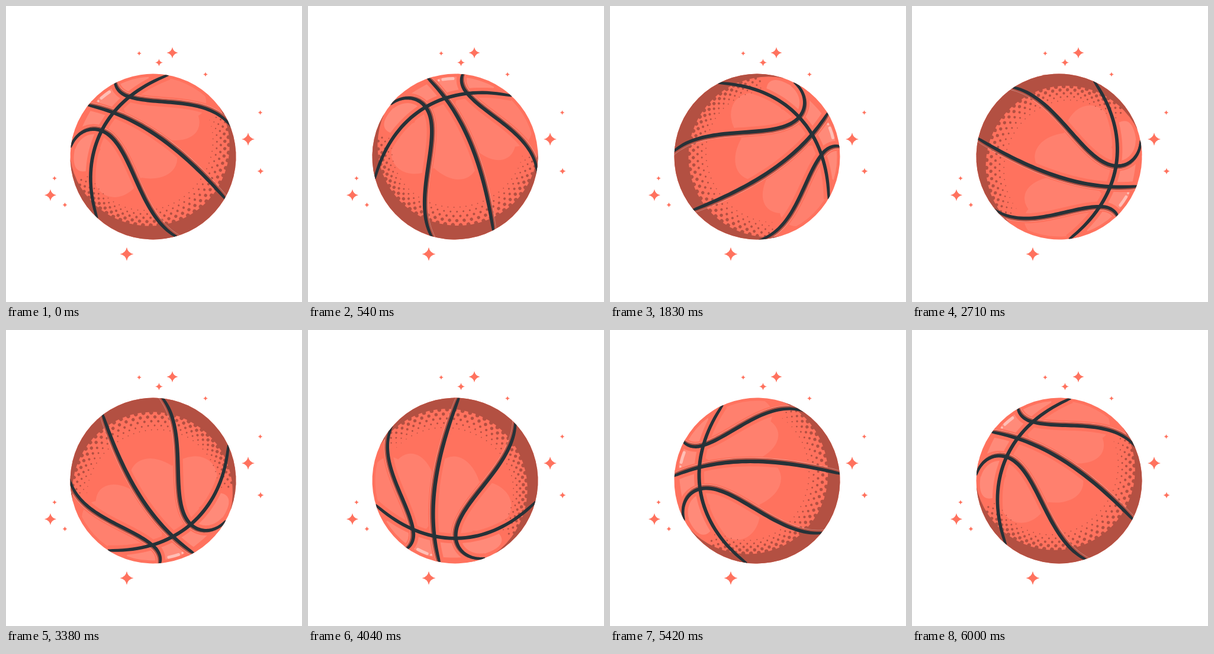
Recreate the animation shown at these times as an HTML page with a canvas. Size 500 by 500 pixels, loop 6040 ms.

```html
<!DOCTYPE html>
<html lang="en">
<head>
<meta charset="utf-8">
<title>Spinning basketball</title>
<style>
html, body { margin: 0; width: 100%; height: 100%; overflow: hidden; background: #fff; }
canvas { display: block; width: 500px; height: 500px; }
</style>
</head>
<body>
<canvas id="stage"></canvas>
<script>
const canvas = document.getElementById('stage');
const ctx = canvas.getContext('2d');
const dpr = window.devicePixelRatio || 1;
canvas.width = canvas.height = 500 * dpr;

const LOOP = 6040, FRAME = 1000 / 24, TURN = 2.5, TILT = -65;
const CORAL = '#ff725e', SHADE = '#b35042', INK = '#263238';
const CX = 248.5, CY = 254.5, R = 140;
const LIT = { x: 14, y: -13.6, r: 135.5 };
const rad = d => d * Math.PI / 180;
const white = a => `rgba(255,255,255,${a})`;

// Ball geometry is upright, with its centre at the origin.
// Each seam is a chain of cubic Bezier curves.
const seams = {
  left: [[-45, -133], [-22, -136], [2, -122], [3, -96], [5, -40], [-104, 20], [-106, 96]],
  middle: [[32, -138], [53.5, -45], [28, 47], [-13.5, 142]],
  right: [[88, -112], [80, -108], [74, -99], [74, -86], [76, -35], [134, 38], [102, 98]],
  equator: [[-134.5, -41.5], [-52, -117.3], [52, -117], [136, -35]]
};

function bezier(p, t) {
  const u = 1 - t, k = [u * u * u, 3 * u * u * t, 3 * u * t * t, t * t * t];
  return [0, 1].map(axis => k.reduce((sum, f, i) => sum + f * p[i][axis], 0));
}

function sample(chain) {
  const out = [chain[0]];
  for (let i = 0; i + 3 < chain.length; i += 3) {
    for (let s = 1; s <= 40; s++) out.push(bezier(chain.slice(i, i + 4), s / 40));
  }
  return out;
}

function polygon(pts) {
  const path = new Path2D();
  pts.forEach(p => path.lineTo(p[0], p[1]));
  path.closePath();
  return path;
}

// Seams get thinner as the surface turns away at the rim
function ribbon(line) {
  const left = [], right = [];
  line.forEach(([x, y], i) => {
    const a = line[Math.max(0, i - 1)], b = line[Math.min(line.length - 1, i + 1)];
    const dx = b[0] - a[0], dy = b[1] - a[1], len = Math.hypot(dx, dy);
    const facing = Math.max(0, 1 - (x * x + y * y) / (R * R));
    const half = (3.4 + 3.1 * facing ** 0.3) / 2;
    const nx = -dy / len * half, ny = dx / len * half;
    left.push([x + nx, y + ny]);
    right.unshift([x - nx, y - ny]);
  });
  return polygon(left.concat(right));
}

function disc(x, y, r) {
  const path = new Path2D();
  path.arc(x, y, r, 0, Math.PI * 2);
  return path;
}

function addEllipse(path, x, y, rx, ry, turn = 0) {
  const oval = new Path2D();
  oval.ellipse(x, y, rx, ry, turn, 0, Math.PI * 2);
  path.addPath(oval);
}

function halftone() {
  const path = new Path2D(), from = 42, to = 221, rows = 5;
  for (let row = 0; row < rows; row++) {
    for (let a = from + (row % 2) * 2.8; a < to; a += 5.6) {
      const depth = 22 + 9 * Math.cos(rad(a - 105)) ** 2;
      const d = LIT.r - 1 - depth * row / (rows - 1);
      const fade = Math.min(1, 0.55 + Math.min(a - from, to - a) / 40);
      path.addPath(disc(LIT.x + d * Math.cos(rad(a)), LIT.y + d * Math.sin(rad(a)), (3.3 - 0.6 * row) * fade));
    }
  }
  return path;
}

const ball = disc(0, 0, R), inside = disc(0, 0, R - 5);
const crescent = disc(0, 0, R + 2);
crescent.addPath(disc(LIT.x, LIT.y, LIT.r));
const dots = halftone();

const lines = {}, ribbons = {};
for (const name in seams) {
  lines[name] = sample(seams[name]);
  ribbons[name] = ribbon(lines[name]);
}
const above = polygon([...lines.equator, [R, -R], [-R, -R]]);

// One oval per panel; the gaps along the seams cut them apart
const lobes = new Path2D();
addEllipse(lobes, -40, -45, 53, 42);
addEllipse(lobes, 2, -30, 46, 71);
addEllipse(lobes, 74, -20, 42, 69);
addEllipse(lobes, 110, -20, 40, 65);
const cap = new Path2D();
addEllipse(cap, 30, -92, 105, 36, 0.12);

function fill(path, color, dx = 0, dy = 0) {
  ctx.save();
  ctx.translate(dx, dy);
  ctx.fillStyle = color;
  ctx.fill(path);
  ctx.restore();
}

function drawHighlights() {
  ctx.save();
  ctx.clip(inside);
  fill(lobes, white(0.1));
  fill(above, CORAL);
  ctx.clip(above);
  fill(cap, white(0.17));
  ctx.restore();

  ctx.strokeStyle = CORAL;
  ctx.lineWidth = 17;
  for (const name in lines) {
    ctx.beginPath();
    lines[name].forEach(p => ctx.lineTo(p[0], p[1]));
    ctx.stroke();
  }
}

function drawShine() {
  ctx.strokeStyle = white(0.45);
  ctx.lineWidth = 5;
  ctx.lineCap = 'round';
  ctx.beginPath();
  ctx.arc(0, 0, 132, rad(-66.5), rad(-59));
  ctx.stroke();
  fill(disc(46, -123.5, 1.8), white(0.45));
}

function drawBall(angle) {
  ctx.save();
  ctx.translate(CX, CY);
  ctx.rotate(angle);
  fill(ball, CORAL);
  ctx.clip(ball);
  drawHighlights();
  drawShine();
  ctx.fillStyle = SHADE;
  ctx.fill(crescent, 'evenodd');
  ctx.fill(dots);
  for (const name of ['left', 'middle', 'right']) {
    fill(ribbons[name], white(0.3), 3.2, 0.6);
    fill(ribbons[name], SHADE, 2.4, 0.4);
  }
  for (const name in ribbons) fill(ribbons[name], INK);
  ctx.restore();
}

// x, y, radius
const sparkles = [
  [281, 79, 9.5], [409, 225, 11], [75, 319.5, 10], [204, 419, 11.5], [225, 80, 4], [258.5, 95.5, 6.3],
  [337, 115.5, 4], [429.5, 180, 4], [430, 279, 5.5], [82, 291, 4], [99.5, 336, 4.2]
];

function drawSparkle([x, y, r]) {
  const k = r * 0.16;
  ctx.beginPath();
  ctx.moveTo(x, y - r);
  ctx.quadraticCurveTo(x + k, y - k, x + r, y);
  ctx.quadraticCurveTo(x + k, y + k, x, y + r);
  ctx.quadraticCurveTo(x - k, y + k, x - r, y);
  ctx.quadraticCurveTo(x - k, y - k, x, y - r);
  ctx.fillStyle = CORAL;
  ctx.fill();
}

function draw(ms) {
  const step = Math.floor((ms % LOOP + 5.01) / FRAME);
  ctx.setTransform(dpr, 0, 0, dpr, 0, 0);
  ctx.fillStyle = '#fff';
  ctx.fillRect(0, 0, 500, 500);
  sparkles.forEach(drawSparkle);
  // Stop just short of a full turn so the loop closes evenly
  drawBall(rad(TILT + Math.min(step * TURN, 360 - TURN)));
}

const start = performance.now();
function tick() {
  draw(performance.now() - start);
  requestAnimationFrame(tick);
}
tick();
</script>
</body>
</html>
```
